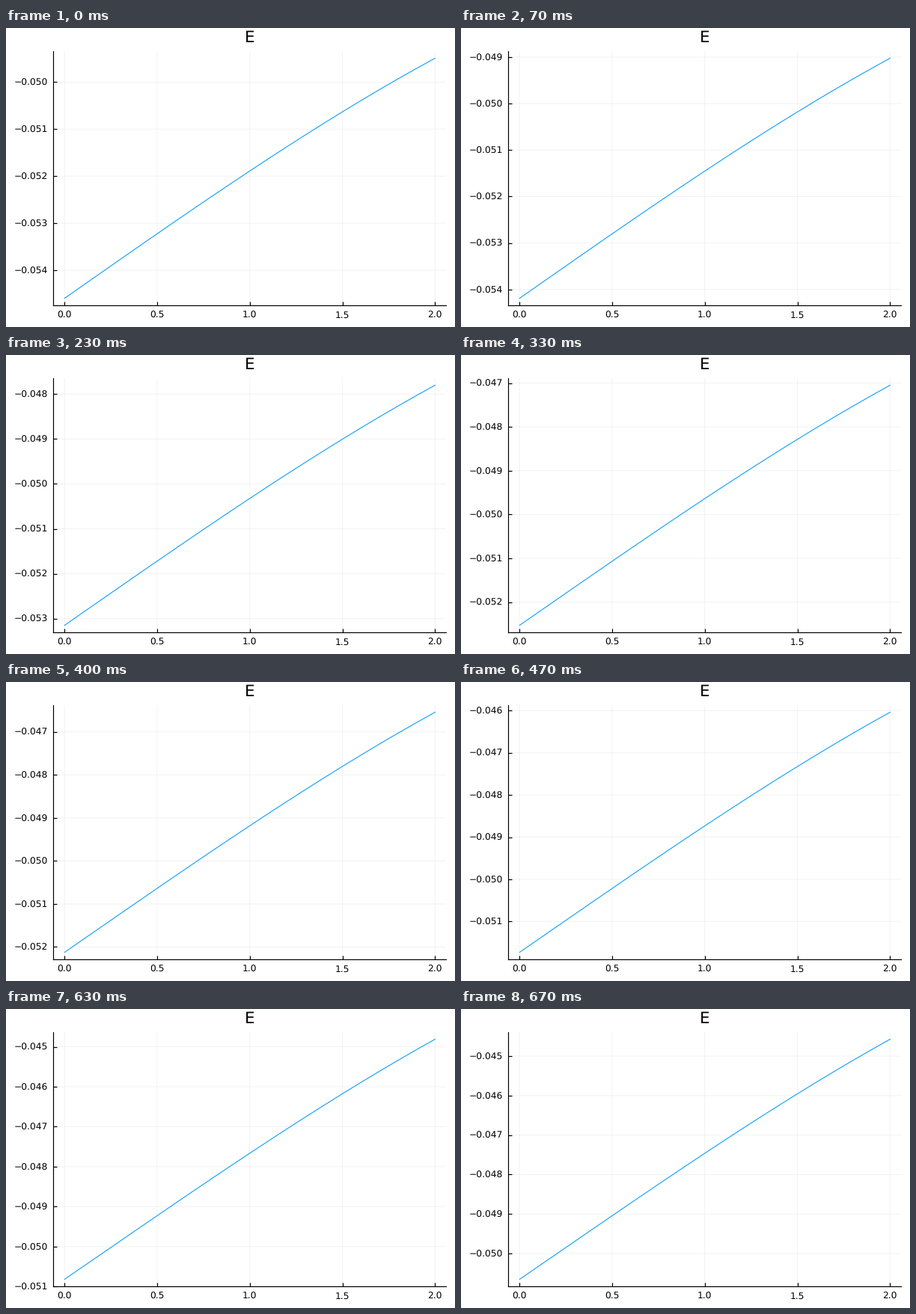
These frames come from a looping animation (600 px wide and 400 px high, 0.71 s). A matplotlib script:

```python
import matplotlib.pyplot as plt
import numpy as np
from matplotlib.animation import FuncAnimation
from matplotlib.ticker import MultipleLocator

W, H, DPI = 600, 400, 100
LEFT, RIGHT, TOP, BOTTOM = 63.3, 588.2, 30.8, 371.3
STEPS = 20           # the curve advances 30 times a second
TICKS_PER_LOOP = 71  # 10 ms each
MARGIN = 0.03

plt.rcParams["font.family"] = "DejaVu Sans"
plt.rcParams["text.hinting"] = "none"


def pt(px):
    return px * 72 / DPI


def swing(step, centre, size, speed, middle):
    """Slow sine drift of one end of the curve."""
    return (centre + size * np.sin(speed * (step - middle))) / 1000


x = np.linspace(0, 2, 21)
u = x / 2


def curve(step):
    lo = swing(step, -53.462, 4.54, 0.046, 5.5)
    hi = swing(step, -46.846, 6.32, 0.040, 10.8)
    bend = 0.122 - 0.022 * step / STEPS
    shape = u + u * (1 - u) * (bend - 0.042 * (1 - 2 * u))
    return lo + (hi - lo) * shape


fig = plt.figure(figsize=(W / DPI, H / DPI), dpi=DPI, facecolor="white")
ax = fig.add_axes([LEFT / W, 1 - BOTTOM / H,
                   (RIGHT - LEFT) / W, (BOTTOM - TOP) / H])
ax.spines[["top", "right"]].set_visible(False)
ax.spines[["left", "bottom"]].set_linewidth(pt(1.2))
ax.set_axisbelow(True)
ax.grid(color="black", alpha=0.05, linewidth=pt(1), snap=False)
ax.tick_params(direction="in", length=pt(5), width=pt(1.2),
               pad=pt(7), labelsize=pt(12.3))
ax.set_xlim(-2 * MARGIN, 2 + 2 * MARGIN)
ax.xaxis.set_major_locator(MultipleLocator(0.5))
ax.xaxis.set_major_formatter(lambda v, _: f"{abs(v):.1f}")
ax.yaxis.set_major_locator(MultipleLocator(0.001))
ax.yaxis.set_major_formatter(lambda v, _: f"{v:.3f}".replace("-", "\u2212"))
fig.text(325.6 / W, 1 - 18.6 / H, "E", fontsize=pt(21.5),
         ha="center", va="baseline")
line, = ax.plot(x, curve(0), color="#009AFA", linewidth=pt(1.05))


def update(tick):
    step = min(STEPS, int((tick + 0.5) * 0.3))
    y = curve(step)
    pad = MARGIN * (y[-1] - y[0])
    line.set_ydata(y)
    ax.set_ylim(y[0] - pad, y[-1] + pad)
    return line,


anim = FuncAnimation(fig, update, frames=TICKS_PER_LOOP, interval=10,
                     init_func=lambda: update(0), repeat=True, repeat_delay=0)
plt.show()
```
